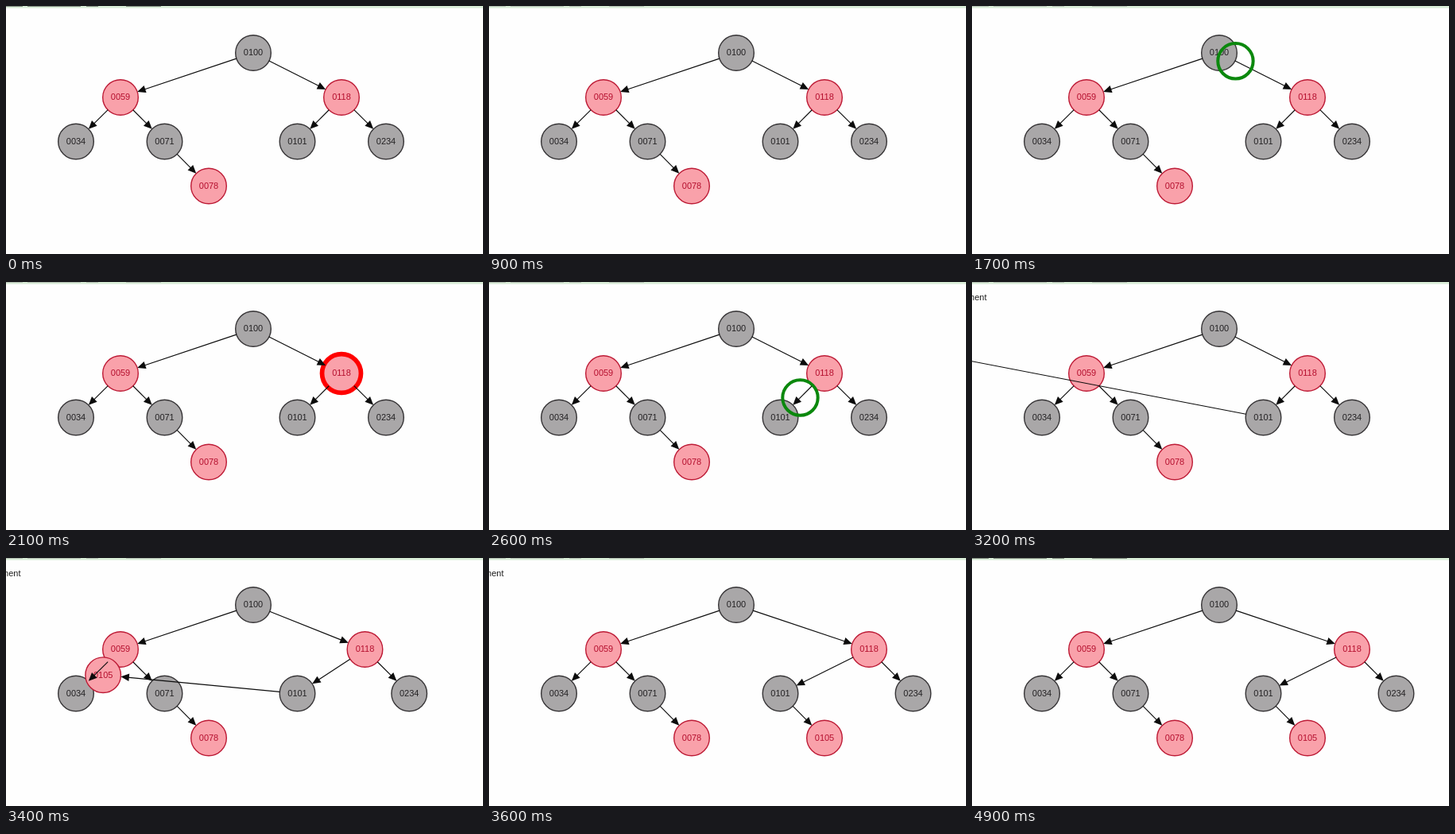
Recreate the animation shown at these times as an HTML page with a canvas. Size 600 by 312 pixels, loop 7.9 s.

```html
<!DOCTYPE html>
<html lang="en">
<head>
<meta charset="utf-8">
<title>Red-black tree insertion</title>
<style>
  html, body { margin: 0; width: 100%; height: 100%; overflow: hidden; background: #fefefe; }
  canvas { display: block; width: 600px; height: 312px; }
</style>
</head>
<body>
<canvas id="stage" width="600" height="312"></canvas>
<script>
const ctx = document.getElementById('stage').getContext('2d');
const LOOP = 7900, TICK = 100, STEP = 380, R = 22.3;
const GRAY = { fill: '#a9a7a8', line: '#363436', text: '#242224' };
const RED = { fill: '#f9a1aa', line: '#bd1a35', text: '#b50f2e' };

// Each node: place before and after the insertion, colours, parent
const nodes = {
  '0100': { from: [311, 59], skin: GRAY },
  '0059': { from: [144, 115], skin: RED, parent: '0100' },
  '0118': { from: [422, 115], to: [478, 115], skin: RED, parent: '0100' },
  '0034': { from: [88, 170.5], skin: GRAY, parent: '0059' },
  '0071': { from: [199.5, 170.5], skin: GRAY, parent: '0059' },
  '0101': { from: [366.5, 170.5], skin: GRAY, parent: '0118' },
  '0234': { from: [478, 170.5], to: [533.5, 170.5], skin: GRAY, parent: '0118' },
  '0078': { from: [255, 226.5], skin: RED, parent: '0071' },
  '0105': { from: [-211, 59], to: [422, 226.5], skin: RED, parent: '0101' }
};

const visits = [
  { key: '0100', start: 1300, end: 1700 },
  { key: '0118', start: 2000, end: 2400 },
  { key: '0101', start: 2800, end: 3200 }
];
const moves = [
  { a: '0100', b: '0118', start: 1630, end: 2000 },
  { a: '0118', b: '0101', start: 2391, end: 2800 }
];
const ATTACH = 3200, DONE = 4000;

const clamp = v => Math.max(0, Math.min(1, v));
const mix = (a, b, p) => [a[0] + (b[0] - a[0]) * p, a[1] + (b[1] - a[1]) * p];
const during = (t, span) => t >= span.start && t < span.end;

function circle([x, y], r) {
  ctx.beginPath();
  ctx.arc(x, y, r, 0, Math.PI * 2);
}

function label(text, x, y, color, align) {
  ctx.font = '11px "Liberation Sans", Arial, sans-serif';
  ctx.textAlign = align;
  ctx.fillStyle = color;
  ctx.fillText(text, x, y);
}

function drawNode(key, pos, halo) {
  const { skin } = nodes[key];
  if (halo) {
    circle(pos, R + halo);
    ctx.fillStyle = '#ff0000';
    ctx.fill();
  }
  circle(pos, R);
  ctx.fillStyle = skin.fill;
  ctx.fill();
  ctx.lineWidth = 1.4;
  ctx.strokeStyle = halo ? '#ff0000' : skin.line;
  ctx.stroke();
  label(key, pos[0], pos[1] + 3.4, skin.text, 'center');
}

function drawEdge(a, b) {
  const angle = Math.atan2(b[1] - a[1], b[0] - a[0]);
  const tip = Math.hypot(b[0] - a[0], b[1] - a[1]) - R;
  ctx.save();
  ctx.translate(a[0], a[1]);
  ctx.rotate(angle);
  ctx.strokeStyle = ctx.fillStyle = '#0c0c0c';
  ctx.lineWidth = 1.15;
  ctx.beginPath();
  ctx.moveTo(R, 0);
  ctx.lineTo(tip - 3, 0);
  ctx.stroke();
  ctx.beginPath();
  ctx.moveTo(tip, 0);
  ctx.lineTo(tip - 10.5, -4.7);
  ctx.lineTo(tip - 10.5, 4.7);
  ctx.fill();
  ctx.restore();
}

function drawToolbar(busy) {
  ctx.fillStyle = '#d9edd7';
  ctx.fillRect(0, 0, 600, 2.6);
  ctx.fillStyle = busy ? '#b6c1b5' : '#818b80';
  for (const [x, w] of [[0, 21], [27, 67], [101, 15], [151, 44]]) ctx.fillRect(x, 0, w, 1);
}

function draw(t) {
  ctx.fillStyle = '#fefefe';
  ctx.fillRect(0, 0, 600, 312);
  drawToolbar(t >= 900 && t < DONE);

  const shift = clamp((t - ATTACH) / STEP);
  const place = key => mix(nodes[key].from, nodes[key].to || nodes[key].from, shift);
  const visit = visits.find(v => during(t, v));
  const pulse = 4.4 + 1.1 * Math.cos((t - 1300) / 150);
  const keys = Object.keys(nodes).filter(k => k !== '0105' || t >= ATTACH);

  for (const key of keys) drawNode(key, place(key), visit && visit.key === key ? pulse : 0);
  for (const key of keys) {
    const { parent } = nodes[key];
    if (parent) drawEdge(place(parent), place(key));
  }

  const move = moves.find(m => during(t, m));
  if (move) {
    circle(mix(place(move.a), place(move.b), clamp((t - move.start) / STEP)), 22.2);
    ctx.lineWidth = 4;
    ctx.strokeStyle = '#0b880d';
    ctx.stroke();
  }

  if (t >= ATTACH && t < DONE) label('inserting element', 18.5, 23, '#1c1c1c', 'right');
}

const origin = performance.now();
function frame() {
  const t = (performance.now() - origin) % LOOP;
  draw(Math.floor(t / TICK) * TICK);
  requestAnimationFrame(frame);
}
frame();
</script>
</body>
</html>
```
